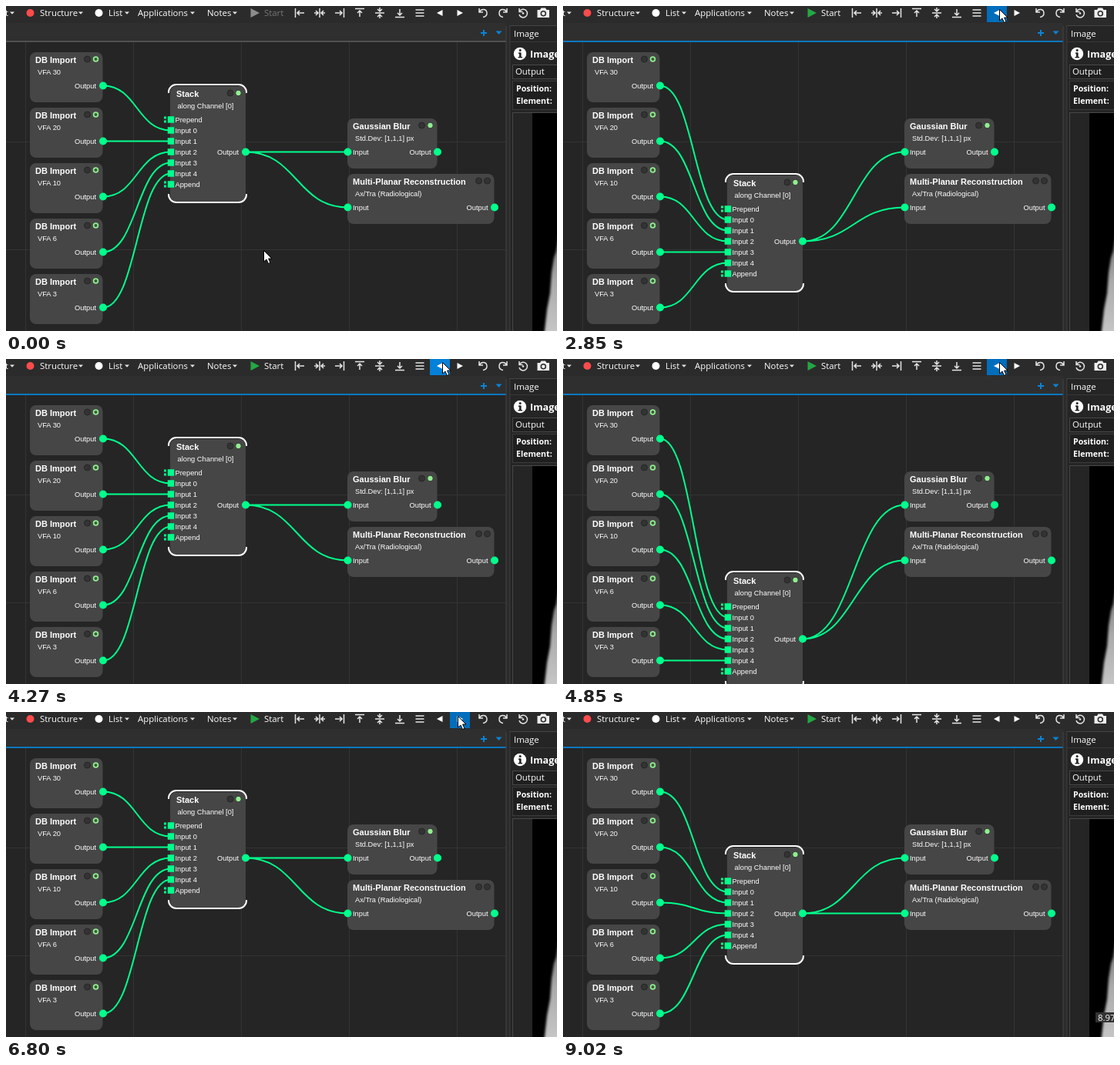
Animation, 715 px wide and 422 px high, one loop 9250 ms. Source, as an HTML page:

```html
<!DOCTYPE html>
<html lang="en">
<head>
<meta charset="utf-8">
<title>Node alignment</title>
<style>
html, body { margin: 0; width: 100%; height: 100%; overflow: hidden; background: #252525; }
svg { display: block; }
text { fill: #fff; white-space: pre; }
.node text { font: 9.3px "Liberation Sans", Arial, sans-serif; }
.node .title { font-size: 11px; font-weight: bold; }
.ui { font: 11.4px "Open Sans", "Noto Sans", sans-serif; }
.bold { font: bold 10.6px "Open Sans", "Noto Sans", sans-serif; }
.wire { fill: none; stroke: #00ff8c; stroke-width: 2; }
.icon { fill: none; stroke: #e6e6e6; stroke-width: 1.5; }
</style>
</head>
<body>
<svg id="stage" width="715" height="422" viewBox="0 0 715 422"></svg>
<script>
const LOOP = 9250;
const GREEN = '#00ff8c';
const HOVER = '#006ebc', PRESS = '#0480d8', OFF = 'none';

// Each row: start time in ms, then the value held from there on.
const OFFSETS = [
  [0, 0], [2390, 58], [2850, 116], [3210, 174], [3690, -58], [3930, 0],
  [4290, 58], [4510, 116], [4850, 174], [5230, -58], [5590, 0],
  [6320, 72], [6680, 0], [7040, 72], [7370, 0], [7610, 72]
];
const PREV = [
  [0, OFF], [1770, HOVER], [2270, PRESS], [2490, HOVER], [2610, PRESS],
  [2850, HOVER], [2970, PRESS], [3330, HOVER], [3450, PRESS], [3690, HOVER],
  [3810, PRESS], [4050, HOVER], [4170, PRESS], [4410, HOVER], [4610, PRESS],
  [4850, HOVER], [4990, PRESS], [5350, HOVER], [5470, PRESS], [5590, HOVER],
  [5950, OFF]
];
const NEXT = [
  [0, OFF], [1650, HOVER], [2020, OFF], [5830, HOVER], [6200, PRESS],
  [6440, HOVER], [6560, PRESS], [6800, HOVER], [6920, PRESS], [7160, HOVER],
  [7280, PRESS], [7370, HOVER], [7490, PRESS], [7730, HOVER], [7850, PRESS],
  [7970, OFF]
];
const CURSOR = [
  [0, [334, 317]], [370, [318, 278]], [480, [283, 203]], [580, [270, 178]],
  [1050, [284, 166]], [1170, [337, 124]], [1290, [420, 75]], [1410, [500, 36]],
  [1530, [554, 15]], [1650, [579, 6]], [1770, [566, 4]], [5830, [586, 5]],
  [8680, [606, 30]], [8800, [648, 106]], [8900, [695, 250]], [9020, [730, 380]]
];

const at = (rows, t) => rows.reduce((v, row) => t >= row[0] ? row[1] : v, rows[0][1]);

const rect = (x, y, w, h, fill, r = 0) =>
  `<rect x="${x}" y="${y}" width="${w}" height="${h}" rx="${r}" fill="${fill}"/>`;
const frame = (x, y, w, h, fill, stroke) =>
  `<rect x="${x}" y="${y}" width="${w}" height="${h}" fill="${fill}" stroke="${stroke}"/>`;
const dot = (x, y, r, fill, extra = '') =>
  `<circle cx="${x}" cy="${y}" r="${r}" fill="${fill}" ${extra}/>`;
const label = (x, y, s, cls = '', extra = '') =>
  `<text x="${x}" y="${y}" class="${cls}" ${extra}>${s}</text>`;
const shape = (d, fill) => `<path d="${d}" fill="${fill}"/>`;
const line = (d, extra = '') => `<path class="icon" d="${d}" ${extra}/>`;
const right = 'text-anchor="end"';

const port = (x, y) => dot(x, y, 5, GREEN);
const lamp = (x, y) => dot(x, y, 4, '#333', 'stroke="#262626"');
const lit = (x, y) => dot(x, y, 3.8, '#90ee90', 'stroke="#333"');
const ring = (x, y) => dot(x, y, 2.9, '#3c5a3c', 'stroke="#90ee90" stroke-width="1.7"');

function wire(x1, y1, x2, y2) {
  const mid = (x1 + x2) / 2;
  return `M${x1} ${y1}C${mid} ${y1} ${mid} ${y2} ${x2} ${y2}`;
}

function body(x, y, w, h, title, sub, titleX, subX) {
  return rect(x, y, w, h, '#464646', 8) +
    label(titleX, y + 14, title, 'title') + label(subX, y + 29, sub);
}

function importNode(name, i) {
  const y = 60 + 72 * i;
  return body(31, y, 94.5, 65, 'DB Import', name, 38, 41) +
    lamp(105.5, y + 9) + ring(116.5, y + 9) +
    label(117, y + 47, 'Output', '', right) + port(126, y + 43.5);
}

function filterNode(y, w, title, sub, lamps) {
  const end = 443 + w;
  return body(443, y, w, 65, title, sub, 450, 453) + lamps +
    label(450, y + 47, 'Input') + label(end - 8, y + 47, 'Output', '', right) +
    port(443.5, y + 43.5) + port(end + 0.5, y + 43.5);
}

function stackNode() {
  const names = ['Prepend', 'Input 0', 'Input 1', 'Input 2', 'Input 3', 'Input 4', 'Append'];
  const slots = names.map((name, i) => {
    const y = 147.5 + 14 * i;
    const extra = i % 6 ? '' : rect(205, y - 4, 3, 3, GREEN) + rect(205, y + 1, 3, 3, GREEN);
    return extra + rect(209.75, y - 4.25, 8.5, 8.5, GREEN) + label(219.5, y + 3.5, name);
  }).join('');
  return body(213, 104, 98, 150, 'Stack', 'along Channel [0]', 221, 222.5) +
    `<path d="M211 113V112A10 10 0 0 1 221 102H302A10 10 0 0 1 312 112V113
      M211 244V245A10 10 0 0 0 221 255H302A10 10 0 0 0 312 245V244"
      fill="none" stroke="#fff" stroke-width="2"/>` +
    lamp(291, 113) + lit(301.5, 113) + slots +
    label(302, 193, 'Output', '', right) + port(311, 189.5);
}

function graph() {
  let grid = '';
  for (let x = 25; x < 649; x += 140) grid += rect(x, 47, 1, 375, '#343434');
  for (let y = 176; y < 422; y += 140) grid += rect(0, y, 649, 1, '#343434');
  return `<g class="node" clip-path="url(#canvas)">${grid}
    <path id="wires" class="wire"/>` +
    ['VFA 30', 'VFA 20', 'VFA 10', 'VFA 6', 'VFA 3'].map(importNode).join('') +
    filterNode(146, 116.5, 'Gaussian Blur', 'Std.Dev: [1,1,1] px',
      lamp(539.5, 155) + lit(550.5, 155)) +
    filterNode(218, 190.5, 'Multi-Planar Reconstruction', 'Ax/Tra (Radiological)',
      lamp(613.5, 227) + lamp(624.5, 227)) +
    `<g id="stack">${stackNode()}</g></g>`;
}

// Arrow with its tip at the origin, turned by a multiple of 90 degrees.
const arrow = (x, y, turn, len = 9) =>
  line(`M${len} 0H1M4 -3L1 0L4 3`, `transform="translate(${x} ${y}) rotate(${turn})"`);

function alignIcons() {
  return line('M375.5 3V15') + arrow(377, 9, 0, 10) +
    line('M407 3V15') + arrow(406, 9, 180, 6) + arrow(408, 9, 0, 6) +
    line('M438.5 3V15') + arrow(437, 9, 180, 10) +
    line('M453 3.5H465') + arrow(459, 5, 90) +
    line('M479 9H491') + arrow(485, 8, 270, 6) + arrow(485, 10, 90, 6) +
    line('M505 14.5H517') + arrow(511, 13, 270) +
    line('M531.5 5H542.5M531.5 9H542.5M531.5 13H542.5');
}

function toolbar() {
  const drop = x => shape(`M${x - 3} 7.5H${x + 3}L${x} 10.8Z`, '#e6e6e6');
  const items = [[44, 'Structure'], [133, 'List'], [171, 'Applications'], [261, 'Notes']];
  const undo = 'M614 3V8H619M614.5 7.5C617 3 624 3.5 624 9.5C624 12 622 14 619 14.5';
  return rect(0, 0, 715, 22, '#2b2b2b') + rect(0, 22, 649, 24, '#2f2f2f') +
    label(3, 13, 't', 'ui', right) +
    items.map(([x, s]) => label(x, 13, s, 'ui')).join('') +
    [8, 97, 157, 242, 297].map(drop).join('') +
    dot(31.5, 9, 5, '#ff4b4b') + dot(120.5, 9, 5, '#fff') +
    `<path id="play" d="M317.5 3L329 9L317.5 15Z"/>` +
    label(335, 13, 'Start', 'ui', 'id="start"') + alignIcons() +
    `<rect id="prev" x="550" width="26" height="21"/><rect id="next" x="576" width="26" height="21"/>` +
    shape('M566.5 5V13L559 9Z', '#fff') + shape('M585.5 5V13L593 9Z', '#fff') +
    line(undo) + line(undo, 'transform="translate(1264 0) scale(-1 1)"') +
    line('M666 3V7.5H670.5M666.5 7A5.3 5.3 0 1 1 666 11') + dot(671, 9.5, 1.3, '#e6e6e6') +
    shape('M689.5 5H693L694.5 2.5H700L701.5 5H705V15H689.5Z', '#eee') +
    dot(697.3, 9.7, 3, '#eee', 'stroke="#2b2b2b" stroke-width="1.5"') +
    rect(616, 34, 8, 2, '#0a84d6') + rect(619, 31, 2, 8, '#0a84d6') +
    shape('M635.5 32.5H643.5L639.5 37Z', '#0a84d6') +
    `<rect id="focus" y="45" width="649" height="2"/>`;
}

function panel() {
  return rect(649, 22, 66, 400, '#2b2b2b') + rect(648.5, 26, 1, 396, '#444') +
    rect(653.5, 25, 62, 1, '#444') + rect(653.5, 25, 1, 397, '#444') +
    rect(654.5, 26, 61, 396, '#252525') + rect(654, 46, 61, 1, '#383838') +
    label(659, 40, 'Image', 'ui') +
    dot(667, 62, 8.2, '#fff') + rect(666, 60.5, 2.6, 6.5, '#222') + rect(664.8, 60.5, 3, 1.4, '#222') +
    rect(664.5, 66, 5.5, 1.4, '#222') + dot(667.2, 57.6, 1.5, '#222') +
    label(680, 67, 'Image', 'bold', 'style="font-size:12.6px"') +
    frame(657.5, 76.5, 70, 18, '#1f1f1f', '#484848') +
    frame(657.5, 97.5, 70, 37, '#1f1f1f', '#3c3c3c') +
    label(661, 89, 'Output', 'ui') + label(662, 111, 'Position:', 'bold') +
    label(662, 127, 'Element:', 'bold') +
    rect(657, 138, 58, 284, '#484848') + rect(658, 139, 57, 283, '#252525') +
    rect(683, 139, 32, 283, '#000') +
    `<g clip-path="url(#scan)"><path d="M717 298L714 318L711 327L708 346L706 373L702 394L698 430H730V298Z"
      fill="url(#tissue)" filter="url(#soft)"/></g>` +
    `<g id="value">${rect(691, 390, 24, 13, '#333')}${label(694, 401, '8.97', 'ui')}</g>`;
}

const stage = document.getElementById('stage');
stage.innerHTML = `<defs>
  <clipPath id="canvas"><rect y="47" width="648" height="375"/></clipPath>
  <clipPath id="scan"><rect x="683" y="139" width="32" height="283"/></clipPath>
  <linearGradient id="tissue" x2="0" y2="1">
    <stop offset="0" stop-color="#777"/><stop offset=".45" stop-color="#aaa"/><stop offset="1" stop-color="#c8c8c8"/>
  </linearGradient>
  <filter id="soft"><feGaussianBlur stdDeviation="1.8"/></filter></defs>` +
  rect(0, 0, 715, 422, '#252525') + graph() + toolbar() + panel() +
  `<path id="cursor" d="M.5 .5V15L4 12L6.5 17.5L9 16.4L6.6 11H11Z" fill="#fff" stroke="#000"/>`;

const el = id => document.getElementById(id);
const set = (id, name, value) => el(id).setAttribute(name, value);

function draw(t) {
  const dy = at(OFFSETS, t);
  let d = '';
  for (let i = 0; i < 5; i++) d += wire(126, 103.5 + 72 * i, 214, 161.5 + 14 * i + dy);
  for (const y of [189.5, 261.5]) d += wire(311, 189.5 + dy, 443.5, y);
  set('wires', 'd', d);
  set('stack', 'transform', `translate(0 ${dy})`);
  set('prev', 'fill', at(PREV, t));
  set('next', 'fill', at(NEXT, t));
  set('focus', 'fill', t < 790 ? '#505050' : '#0a78c2');
  const ready = t >= 1050;
  set('play', 'fill', ready ? '#23a843' : '#8c8c8c');
  el('start').style.fill = ready ? '#fff' : '#777';
  set('value', 'visibility', t >= 8900 ? 'visible' : 'hidden');
  set('cursor', 'transform', `translate(${at(CURSOR, t)})`);
}

const begin = performance.now();
function tick() {
  draw((performance.now() - begin) % LOOP);
  requestAnimationFrame(tick);
}
tick();
</script>
</body>
</html>
```
